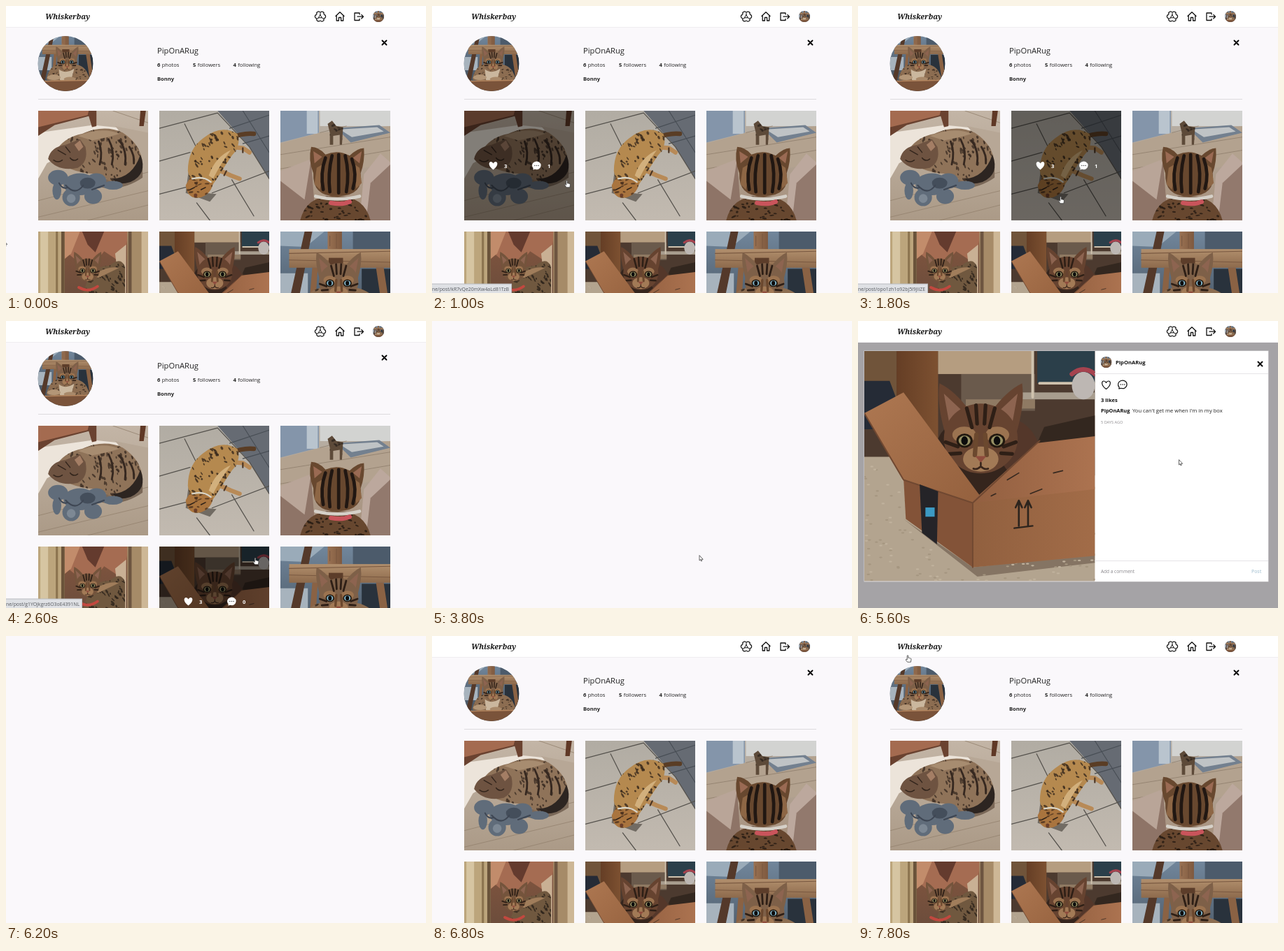
An HTML page with a canvas for the animation above (8000 ms loop, 600 px wide and 411 px high).

```html
<!DOCTYPE html>
<html lang="en">
<head>
<meta charset="utf-8">
<title>Pet photos</title>
<style>
html, body { margin: 0; width: 100%; height: 100%; overflow: hidden; background: #faf8fb; }
canvas { display: block; width: 600px; height: 411px; }
</style>
</head>
<body>
<canvas id="stage"></canvas>
<script>
const LOOP = 8000, STEP = 200;
const SANS = '"Open Sans", "Noto Sans", sans-serif';
const USER = 'PipOnARug';
const canvas = document.getElementById('stage');
const g = canvas.getContext('2d');
const dpr = window.devicePixelRatio || 1;
canvas.width = 600 * dpr;
canvas.height = 411 * dpr;

// ---- drawing helpers ----
function fill(color, d) { g.fillStyle = color; g.fill(new Path2D(d)); }
function line(color, width, d) {
  g.strokeStyle = color; g.lineWidth = width;
  g.lineCap = g.lineJoin = 'round';
  g.stroke(new Path2D(d));
}
function rect(color, x, y, w, h) { g.fillStyle = color; g.fillRect(x, y, w, h); }
function oval(color, x, y, rx, ry = rx, turn = 0) {
  g.fillStyle = color;
  g.beginPath(); g.ellipse(x, y, rx, ry, turn, 0, 7); g.fill();
}
function text(s, x, y, size, color = '#222', weight = 400, font = SANS) {
  g.fillStyle = color; g.font = `${weight} ${size}px ${font}`;
  g.fillText(s, x, y);
}
function blend(x0, y0, x1, y1, from, to) {
  const grad = g.createLinearGradient(x0, y0, x1, y1);
  grad.addColorStop(0, from); grad.addColorStop(1, to);
  return grad;
}
function shade(top, bottom) { rect(blend(0, 0, 0, 100, top, bottom), 0, 0, 100, 100); }
function at(x, y, scale, draw) {
  g.save(); g.translate(x, y); g.scale(scale, scale); draw(); g.restore();
}
function random(seed) {
  return () => (seed = (seed * 16807) % 2147483647) / 2147483647;
}
// Spotted coat inside an outline
function coat(color, spot, d, seed, turn = 0) {
  const rnd = random(seed), shape = new Path2D(d);
  g.save();
  g.fillStyle = color; g.fill(shape); g.clip(shape);
  g.globalAlpha = .8;
  for (let i = 0; i < 330; i++)
    oval(spot, rnd() * 100, rnd() * 100, .8 + rnd() * 1.6, .5 + rnd() * .6, turn + rnd() - .5);
  g.restore();
}
function face(x, y, r, fur, eye) {
  at(x, y, r, () => {
    fill(fur, 'M-.95-.1Q-1.2-.9-1.12-1.5Q-.7-1.3-.3-.75ZM.95-.1Q1.2-.9 1.12-1.5Q.7-1.3 .3-.75Z');
    fill('#8d6450', 'M-.86-.45L-1-1.22L-.5-.75ZM.86-.45L1-1.22L.5-.75Z');
    oval(fur, 0, 0, 1, .95);
    oval('#9b7350', -.45, -.1, .32, .22); oval('#9b7350', .45, -.1, .32, .22);
    oval('#a27a56', 0, .56, .48, .34);
    line('#2e1f16', .1, 'M-.38-.82L-.24-.3M-.13-.9L-.1-.4M.13-.9L.1-.4M.38-.82L.24-.3M-.95.1L-.62.22M-.85.42L-.55.4M.95.1L.62.22M.85.42L.55.4');
    line('#6b482e', .12, 'M-.12-.1L-.16.45M.12-.1L.16.45');
    for (const s of [-1, 1]) {
      oval('#21180f', s * .44, .06, .22, .19);
      oval(eye, s * .44, .06, .16, .14);
      oval('#0c0c0c', s * .44, .06, .09, .12);
    }
    fill('#8f4c3d', 'M-.15.48H.15L0 .66Z');
    line('#39251b', .05, 'M0 .66V.76M-.2.82Q-.1.86 0 .76Q.1.86 .2.82');
  });
}

// ---- photos, each in a 100 by 100 box ----
function napping() {
  shade('#c3b5a6', '#ab9a87');
  fill('#ece4da', 'M0 20L50 13L78 16L40 30L8 48L0 62Z');
  fill('#b7a796', 'M70 14L100 20V52L92 40Z');
  line('#93816d', .5, 'M0 82L100 56M0 97L100 73M45 100L100 86M68 0L100 11');
  fill('#6a4230', 'M0 0H53V14L49 15L46 5L15 13L0 23Z');
  fill('#a46b50', 'M0 0H46L45 4L0 15Z');
  fill('#5f3826', 'M93 0H98L96 14H92Z');
  fill('#7a6858', 'M12 55Q55 72 95 53L95 61Q78 73 58 70Z');
  coat('#8f7359', '#3c2d23', 'M18 34Q25 24 40 21Q60 12 77 20Q94 31 95 49Q94 63 77 65Q66 68 57 58Q30 57 22 48Z', 8, 1.2);
  fill('#a78c70', 'M36 23Q58 14 74 21Q61 25 49 27Z');
  line('#362820', 1.8, 'M55 28Q59 38 56 49M64 26Q70 37 67 49M74 27Q81 37 79 49M83 33Q88 41 87 48');
  fill('#2d2521', 'M93 40Q100 58 84 65Q71 69 68 62Q86 61 93 40Z');
  fill('#6e5341', 'M9 44Q11 33 25 31L38 26L43 33Q46 47 36 52Q18 56 9 44Z');
  fill('#a47e65', 'M33 31L38 27L41 33L37 37Z');
  line('#33251c', .9, 'M14 45Q18 48 22 45M29 43Q32 47 36 44M18 36L25 40M25 33L29 38');
  for (const [x, y, rx, ry] of [[18, 61, 9, 7], [38, 67, 15, 10], [53, 64, 9, 7], [68, 68, 9, 4], [30, 79, 8, 8], [50, 78, 8, 7], [17, 73, 4, 8]])
    oval('#606c7a', x, y, rx, ry);
  oval('#444e5b', 45, 66, 7, 5); oval('#7d8894', 30, 80, 4, 4);
  line('#3e4653', 1.3, 'M25 68Q34 78 41 68M49 72L60 68M19 66Q22 72 27 70');
}
function sunning() {
  shade('#b1aca3', '#c2bab0');
  fill('#666b73', 'M53 0H100V62L82 33Z');
  line('#474d54', .7, 'M64 16L100 4M76 30L100 23M76 0L100 38');
  line('#54514c', .8, 'M0 16L53 2M23 12L36 38M0 46L28 38M0 76L27 69M48 75L100 55M66 63L86 96M53 2L82 33L100 62M34 84L46 100');
  fill('#716b63', 'M27 52L31 74L52 76L46 83L24 75Z');
  line('#5a3d25', 4.2, 'M64 25Q76 20 86 21');
  line('#b88a57', 4, 'M63 33L76 34L82 38M54 54L65 59L73 62');
  line('#4b3524', 1.4, 'M69 33V37M76 34V38M61 55L59 59');
  coat('#b5894f', '#37281c', 'M26 55Q26 35 40 25Q56 12 71 21Q75 31 66 41Q58 53 51 64Q45 74 38 72L29 68Z', 21, .8);
  fill('#d2b07d', 'M65 36Q56 48 49 62L45 59Q51 42 65 36Z');
  coat('#a9743e', '#4d321f', 'M24 68L28 61L33 63L42 62L49 66Q47 76 38 79Q26 82 24 68Z', 27);
  line('#d8d4c7', 1.4, 'M30 62Q40 59 47 65');
  line('#2d2119', 1, 'M28 72L32 70M38 72L42 70');
  oval('#6b3e2a', 33, 77, 1.6);
}
function lookingBack() {
  shade('#b9b2a8', '#a58d78');
  fill('#8495aa', 'M0 0H35V20L0 29Z');
  rect('#b9c4ce', 24, 0, 10, 21);
  rect('#d2d3d1', 36, 0, 64, 14);
  fill('#b3a28f', 'M0 30L36 20L100 14V48L0 65Z');
  line('#8e7d6b', .5, 'M0 40L100 24M0 53L100 36M36 20L60 14');
  fill('#73808f', 'M51 16L90 13L100 20L64 29Z');
  fill('#bfc3c5', 'M54 17L88 15L94 19L65 24Z');
  coat('#5d4a39', '#2e251e', 'M43 12L47 9L51 14L57 15L56 31H54V22L48 23V31H45L45 20Z', 36);
  fill('#8e7467', 'M0 62L28 46L32 100H0Z');
  fill('#b9a598', 'M0 55L28 44L22 81L0 64Z');
  fill('#bca89d', 'M76 58L91 39L100 47V100H72Z');
  fill('#92796d', 'M82 66L100 49V100H78Z');
  coat('#67472f', '#241912', 'M18 100Q24 76 51 78Q76 77 82 100Z', 39);
  fill('#68482f', 'M30 57Q25 45 28 33Q35 33 41 40Q52 35 63 41Q70 34 76 34Q77 46 73 57Q76 77 53 78Q29 79 30 57Z');
  fill('#9a6a53', 'M31 48L30 37L38 42ZM72 48L74 37L66 43Z');
  fill('#8d6645', 'M33 52L40 48L36 72L31 67ZM72 52L66 48L69 71L74 66Z');
  line('#211712', 3, 'M41 43Q36 57 39 72M47 41Q43 57 45 74M53 40V75M59 41Q63 57 60 74M65 44Q70 58 66 71');
  line('#d5d0c8', 3, 'M32 78Q52 83 72 78');
  line('#c9545b', 4, 'M46 84Q56 86 63 83');
}
function window_() {
  shade('#84563f', '#5a4639');
  fill('#a56c52', 'M20 0H82L78 30L60 18L46 36L26 19Z');
  fill('#643b2e', 'M40 0H60L52 19L45 12Z');
  fill('#c28c6b', 'M24 0H38L30 20L24 25Z');
  fill('#c9b094', 'M70 20L80 12V70H76Z');
  rect('#bca57c', 0, 0, 24, 100);
  rect('#d6c5a2', 2, 0, 7, 100);
  rect('#8c744f', 16, 0, 2, 100);
  rect('#6a533a', 21, 0, 3, 100);
  rect('#a68b68', 81, 0, 19, 100);
  rect('#6d5540', 82, 0, 3, 100);
  rect('#cdb796', 94, 0, 6, 100);
  coat('#70583f', '#2d231b', 'M46 41Q53 31 65 31Q76 22 79 33V85H31Z', 49, .9);
  fill('#a07d5b', 'M48 42Q60 31 74 33L55 42Z');
  face(45, 35, 11, '#74543c', '#a9a170');
  line('#c2483f', 2.5, 'M37 51Q46 56 54 50');
}
function carpet() {
  fill('#b3a48f', 'M0 46H100V100H0Z');
  fill('#857463', 'M17 73L47 94L100 88V92L49 98Z');
  const rnd = random(77);
  for (let i = 0; i < 260; i++)
    oval(i % 2 ? '#c0b29d' : '#a59680', rnd() * 100, 48 + rnd() * 52, .7, .35);
}
function boxed() {
  shade('#8c755f', '#c5b6a1');
  rect('#4c3a2f', 0, 0, 100, 54);
  rect('#70543a', 0, 0, 14, 29);
  fill('#252b36', 'M0 13H11L14 21L9 34H0Z');
  rect(blend(14, 0, 32, 0, '#653e25', '#7d5131'), 14, 0, 18, 40);
  rect('#b59d80', 32, 0, 41, 10);
  rect('#6a5a4c', 42, 10, 32, 16);
  rect('#8f7a63', 44, 21, 30, 4);
  rect('#2b3f4a', 75, 0, 25, 14);
  rect('#a89d8e', 67, 18, 33, 3);
  line('#cfc2ae', 1.2, 'M73 0V20M100 14H76');
  oval('#bdb7b3', 95, 15, 5, 6);
  line('#a6434f', 2, 'M90 10Q95 6 100 10');
  carpet();
  fill('#35251d', 'M32 38Q36 29 50 29Q76 31 77 49L52 68Z');
  oval('#54372a', 67, 43, 9, 14, -.4);
  face(50.5, 38, 16, '#664330', '#969064');
  fill('#835338', 'M17 55L47 65V94L18 73Z');
  fill(blend(47, 0, 100, 0, '#91603f', '#a26c48'), 'M47 65L100 59V89L47 94Z');
  fill(blend(0, 20, 45, 65, '#ad7751', '#96623f'), 'M0 27L17 18L51 64L47 66L17 56Z');
  fill(blend(47, 0, 100, 0, '#925f40', '#ac7350'), 'M47 65L76 39L100 36V60L47 66Z');
  fill('#33271f', 'M78 33L100 28V37L75 40Z');
  line('#704831', .6, 'M0 27L17 56L47 66L76 39M47 66V94');
  line('#372920', .5, 'M62 56L67 53M72 62L77 60M82 53L86 52M55 63L57 62');
  fill('#252428', 'M24 58L32 61L31.5 84L25 79Z');
  rect('#3c9ac3', 26.5, 68, 4, 4);
  for (const x of [67, 71]) line('#2d241d', .8, `M${x} 76V66M${x - 1.4} 68L${x} 65L${x + 1.4} 68`);
  line('#2d241d', .7, 'M65 77L73 76');
}
function perched() {
  shade('#71869b', '#3c4651');
  fill('#9aabb9', 'M0 0H40L23 14L0 13Z');
  rect('#4c5b6b', 66, 0, 34, 17);
  fill('#a7b3bd', 'M0 38H25V62H0Z');
  rect('#29323c', 74, 34, 26, 46);
  fill('#54392a', 'M22 0H29L9 100H0Z');
  rect(blend(43, 0, 56, 0, '#9a7253', '#7e593f'), 43, 0, 13, 34);
  rect(blend(0, 16, 0, 33, '#b18f6d', '#8d6a4c'), 8, 16, 92, 17);
  line('#795840', .7, 'M8 20L100 18M8 26L100 28M45 4V13M51 2V15');
  rect('#5c3d2a', 44, 24, 13, 10);
  fill('#8a6244', 'M29 33L34 33L31 80H25ZM87 33H94L100 73H93Z');
  coat('#8c6d51', '#382a20', 'M16 76Q22 52 40 51Q78 46 88 64L96 81Q62 90 16 79Z', 59);
  fill('#cab79e', 'M38 60Q50 70 66 59L60 80H40Z');
  face(53, 46, 18, '#7e6048', '#83b6cb');
  oval('#b39677', 29, 75, 12, 5); oval('#a8896a', 58, 78, 11, 4);
  rect('#7a533a', 0, 81, 100, 19);
  line('#b5865f', 2, 'M0 82L100 80');
}

const tiles = [
  [napping, 46, 150, 3, 1, 'kR7vQe20mXw4aLd81TzB'],
  [sunning, 219, 150, 3, 1, 'opo1zh1o92bj5l9JIiZE'],
  [lookingBack, 392, 150, 2, 0, 'w5Ub3nYq8Hc06sKfPj2M'],
  [window_, 46, 323, 2, 0, 'Zt41gVx9eDo7iNr3Ay6C'],
  [boxed, 219, 323, 3, 0, 'g1YOjkgrz6O3oE4391NL'],
  [perched, 392, 323, 2, 1, 'b8Lm2Fs5pWh0uJk7Gq4X']
];
const TILE = 157;

function photo(draw, x, y, size) {
  g.save();
  g.beginPath(); g.rect(x, y, size, size); g.clip();
  at(x, y, size / 100, draw);
  g.restore();
}
function avatar(x, y, r) {
  g.save();
  g.beginPath(); g.arc(x, y, r, 0, 7); g.clip();
  at(x - r, y - r, r / 50, perched);
  g.restore();
}

// ---- icons ----
const HEART = 'M0 6C-8 0-6.5-5.5-3.3-5.5Q-1-5.5 0-3Q1-5.5 3.3-5.5C6.5-5.5 8 0 0 6Z';
const BUBBLE = 'M-5.2 6L-4.8 3.8A6.3 5.8 0 1 1-2.4 5.3Z';
function dots(color) { for (const x of [-2.7, 0, 2.7]) oval(color, x, 0, .8); }
function cross(x, y) {
  at(x, y, 1, () => line('#000', 1.9, 'M-3-3L3 3M3-3L-3 3'));
}
function pawIcon() {
  for (let i = 0; i < 6; i++) {
    const a = i * Math.PI / 3;
    g.beginPath();
    g.arc(4.9 * Math.cos(a), 4.9 * Math.sin(a), 2.7, a - 1.5, a + 1.5);
    g.strokeStyle = '#111'; g.lineWidth = 1.2; g.stroke();
  }
  line('#111', 1, 'M0-2.2L2.2 1.8H-2.2ZM0-2.2V-5.2M2.2 1.8L4.6 3.2M-2.2 1.8L-4.6 3.2');
}
function header() {
  rect('#fff', 0, 0, 600, 30);
  rect('#efedf0', 0, 30, 600, 1);
  text('Whiskerbay', 56, 19, 10.5, '#161616', 'italic 700', '"Noto Serif", serif');
  at(449, 15, 1, pawIcon);
  at(477, 15, 1, () => line('#111', 1.3, 'M-6-.5L0-6.2L6-.5M-4.8-1.5V6H-1.6V1.5H1.6V6H4.8V-1.5'));
  at(504, 15, 1, () => line('#111', 1.3, 'M1-3V-5H-6V5.5H1V3.5M-2 .2H6.3M3.8-2.6L6.5.2L3.8 3'));
  avatar(532, 15, 8);
}

// ---- screens ----
function stat(n, label, x) {
  text(n, x, 87, 7.6, '#222', 700);
  text(label, x + 6.7, 87, 7.6);
}
function hoverCard([, x, y, likes, comments, id]) {
  const cy = y + 78.5;
  rect('rgba(0,0,0,.45)', x, y, TILE, TILE);
  at(x + 41.5, cy, 1, () => fill('#fff', HEART));
  at(x + 103.5, cy, 1, () => { fill('#fff', BUBBLE); dots('#555'); });
  text(likes, x + 57, cy + 3, 7.6, '#fff', 700);
  text(comments, x + 119, cy + 3, 7.6, '#fff', 700);
  return 'ne/post/' + id;
}
function status(url) {
  g.font = `6.9px ${SANS}`;
  const w = g.measureText(url).width + 3;
  rect('#b9bbbf', 0, 397.5, w + 1, 14);
  rect('#dfe1e5', 0, 398.5, w, 13);
  text(url, 0, 407.5, 6.9, '#55585d');
}
function profile(pos) {
  header();
  avatar(85, 82.5, 39.5);
  text(USER, 216, 67.5, 11.2);
  stat('6', 'photos', 216);
  stat('5', 'followers', 267);
  stat('4', 'following', 324.5);
  text('Bonny', 216, 107, 7.6, '#222', 700);
  cross(540.5, 52.5);
  rect('#dddbde', 46, 133, 503, 1);
  for (const [draw, x, y] of tiles) photo(draw, x, y, TILE);
  const hit = pos && tiles.find(([, x, y]) =>
    pos[0] >= x && pos[0] < x + TILE && pos[1] >= y && pos[1] < y + TILE);
  if (hit) status(hoverCard(hit));
  return hit || (pos && pos[1] < 31);
}
function post() {
  rect('#a5a3a6', 0, 31, 600, 380);
  header();
  rect('#d7d5d8', 8.5, 42.5, 578, 331);
  rect('#fff', 338, 43, 248, 330);
  photo(boxed, 9, 43, 329.5);
  avatar(354.5, 59, 8);
  text(USER, 368, 62, 7.6, '#111', 700);
  cross(574.5, 61.5);
  rect('#e6e4e7', 338, 75, 248, 1);
  at(354.5, 91.5, 1, () => line('#111', 1.2, HEART));
  at(378, 91, 1, () => { line('#111', 1.2, BUBBLE); dots('#111'); });
  text('3 likes', 347, 115.5, 7.6, '#111', 700);
  text(USER, 347, 131, 7.4, '#111', 700);
  text("You can't get me when I'm in my box", 392, 131, 7.6);
  text('5 DAYS AGO', 347, 147, 5.6, '#8c8a8d');
  rect('#e6e4e7', 338, 343, 248, 1);
  text('Add a comment', 347, 360.5, 6.5, '#87858a');
  text('Post', 562, 360.5, 6.8, '#b3cbd9', 600);
}

// ---- pointer: time, x, y ----
const moves = [
  [0, -3.5, 336], [400, 80, 336], [800, 150, 258], [1200, 235, 242],
  [1800, 289.5, 273], [2000, 300, 285], [2600, 356, 339], [3000, 357, 339],
  [3800, 382, 336], [4800, 387.5, 326], [5200, 392, 320], [6000, 525, 78],
  [7200, 74, 30], [7800, 71, 27.5], [8000, 71, 27.5]
];
function pointer(t) {
  if (t >= 6200 && t < 7200) return null;
  const i = moves.findIndex(m => m[0] > t);
  const [t0, x0, y0] = moves[i - 1], [t1, x1, y1] = moves[i];
  const k = (t - t0) / (t1 - t0);
  return [x0 + (x1 - x0) * k, y0 + (y1 - y0) * k];
}
function drawPointer([x, y], hand) {
  const d = hand
    ? 'M-.8 6V.7Q0-.6.8.7V4Q1.8 3.2 2.4 4.2Q3.5 3.7 3.8 4.7Q5 4.4 5 5.7L4.4 9.8H-.4L-2.8 6.6Q-2.6 5-.8 6'
    : 'M0 0V7L1.6 5.6L2.6 8L3.7 7.5L2.7 5.3H4.8Z';
  at(x, y, 1, () => { fill('#fff', d); line('#333', .75, d); });
}

function render(t) {
  g.setTransform(dpr, 0, 0, dpr, 0, 0);
  rect('#faf8fb', 0, 0, 600, 411);
  const pos = pointer(t);
  let hand = false;
  if (t < 3600 || t >= 6800) hand = profile(pos);
  else if (t >= 4200 && t < 6200) post();
  if (pos) drawPointer(pos, hand);
}

let last = -1;
function tick(now) {
  const t = Math.floor((now % LOOP) / STEP) * STEP;
  if (t !== last) render(last = t);
  requestAnimationFrame(tick);
}
tick(0);
</script>
</body>
</html>
```
